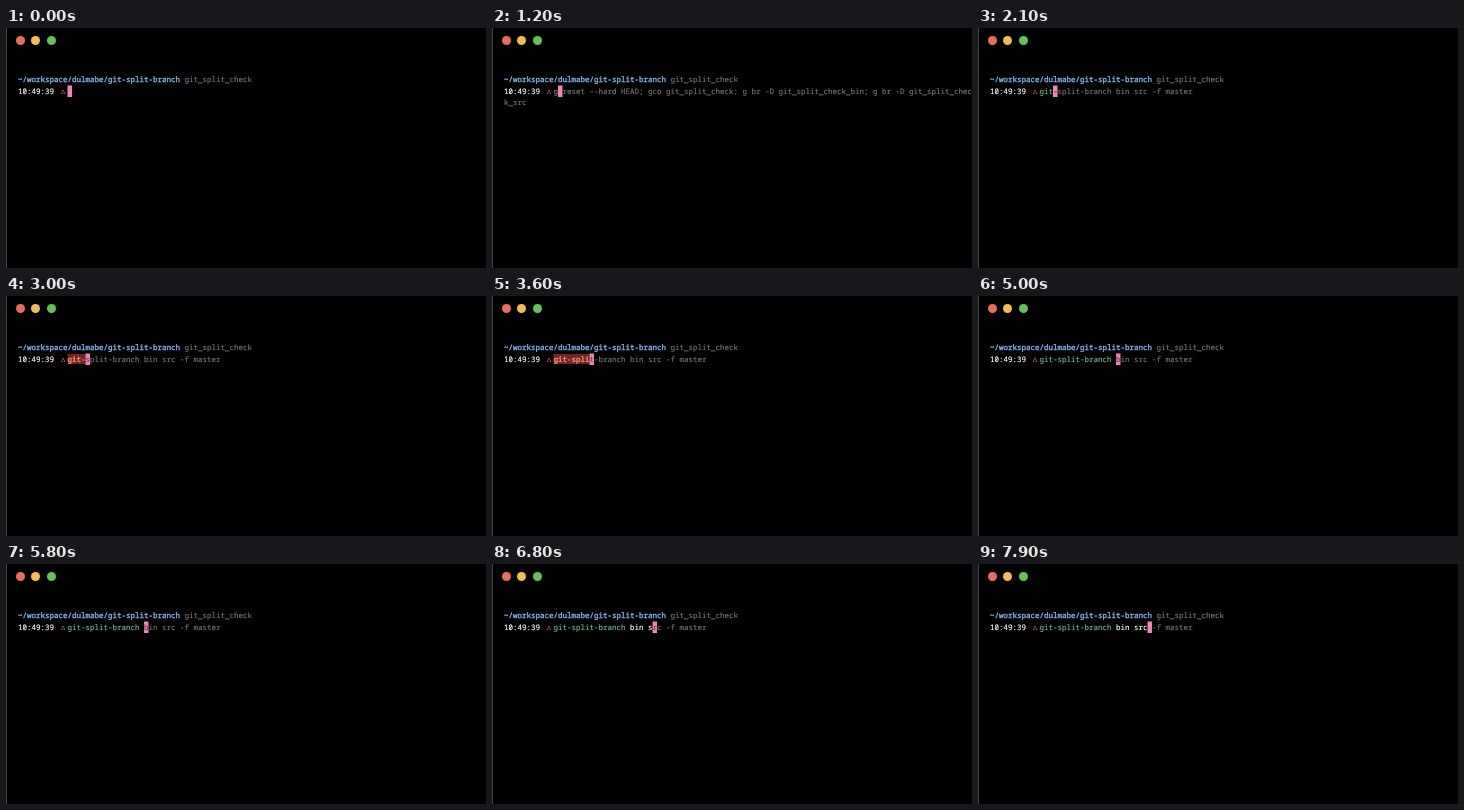
These frames come from a looping animation (480 px wide and 240 px high, 8 s). An HTML page:

```html
<!DOCTYPE html>
<html lang="en">
<head>
<meta charset="utf-8">
<title>Terminal typing</title>
<style>
html, body { margin: 0; width: 100%; height: 100%; overflow: hidden; background: #000; }
.window {
  position: absolute; width: 480px; height: 240px; overflow: hidden;
  box-sizing: border-box; border-left: 1px solid #444;
}
.light { position: absolute; top: 8.4px; width: 9px; height: 9px; border-radius: 50%; }
/* Set at double size so each character advances by whole pixels. */
pre {
  position: absolute; left: 11px; top: 45.5px; margin: 0;
  transform: scale(.5); transform-origin: 0 0;
  font: 15px/23px "Noto Sans Mono", "DejaVu Sans Mono", monospace;
  text-rendering: geometricPrecision; font-variant-ligatures: none;
  -webkit-text-stroke: .3px; color: #fff;
}
.path { color: #7db4ee; -webkit-text-stroke-width: .7px; }
.dim { color: #757575; }
.mark { display: inline-block; width: 9px; color: #e0688a; }
.valid { color: #64be92; }
.alias { color: #6f9a82; }
.unknown { color: #ff8070; background: #6e2622; font-weight: bold; }
#cursor { display: inline-block; width: 9px; height: 23px; vertical-align: top; background: #f283b9; color: #7a3a58; }
</style>
</head>
<body>
<div class="window">
  <i class="light" style="left:9.3px;background:#ee6a5f"></i>
  <i class="light" style="left:24.4px;background:#f5bd4f"></i>
  <i class="light" style="left:39.5px;background:#61c454"></i>
  <pre><span class="path">~/workspace/dulmabe/git-split-branch</span> <span class="dim">git_split_check</span>
10:49:39 <span class="mark">△</span> <span id="command"></span><span id="args"></span><span id="cursor"></span><span id="hint" class="dim"></span></pre>
</div>
<script>
const LOOP = 8000;
const line = "git-split-branch bin src -f master";
const older = "g reset --hard HEAD; gco git_split_check; g br -D git_split_check_bin; g br -D git_split_chec\nk_src";
const nameLength = line.indexOf(" ");
const keyTimes = [
  1000, 1300, 1600,
  2900, 3100, 3200, 3400, 3500, 3800, 3900,
  4100, 4200, 4300, 4400, 4500, 4700, 5000,
  5900, 6100, 6300, 6600, 6800, 7000, 7200
];
const [command, args, cursor, hint] =
  ["command", "args", "cursor", "hint"].map(id => document.getElementById(id));
let shown = -1;

function commandClass(count) {
  if (count === 1) return "alias";
  return count === 3 || count >= nameLength ? "valid" : "unknown";
}

function show(count) {
  const text = count === 1 ? older : line;
  command.textContent = text.slice(0, Math.min(count, nameLength));
  command.className = commandClass(count);
  args.textContent = text.slice(nameLength, Math.max(count, nameLength));
  cursor.textContent = count ? text[count] : " ";
  hint.textContent = count ? text.slice(count + 1) : "";
}

const start = performance.now();
function frame() {
  const time = (performance.now() - start) % LOOP;
  const count = keyTimes.filter(t => t <= time).length;
  if (count !== shown) show(shown = count);
  requestAnimationFrame(frame);
}
frame();
</script>
</body>
</html>
```
